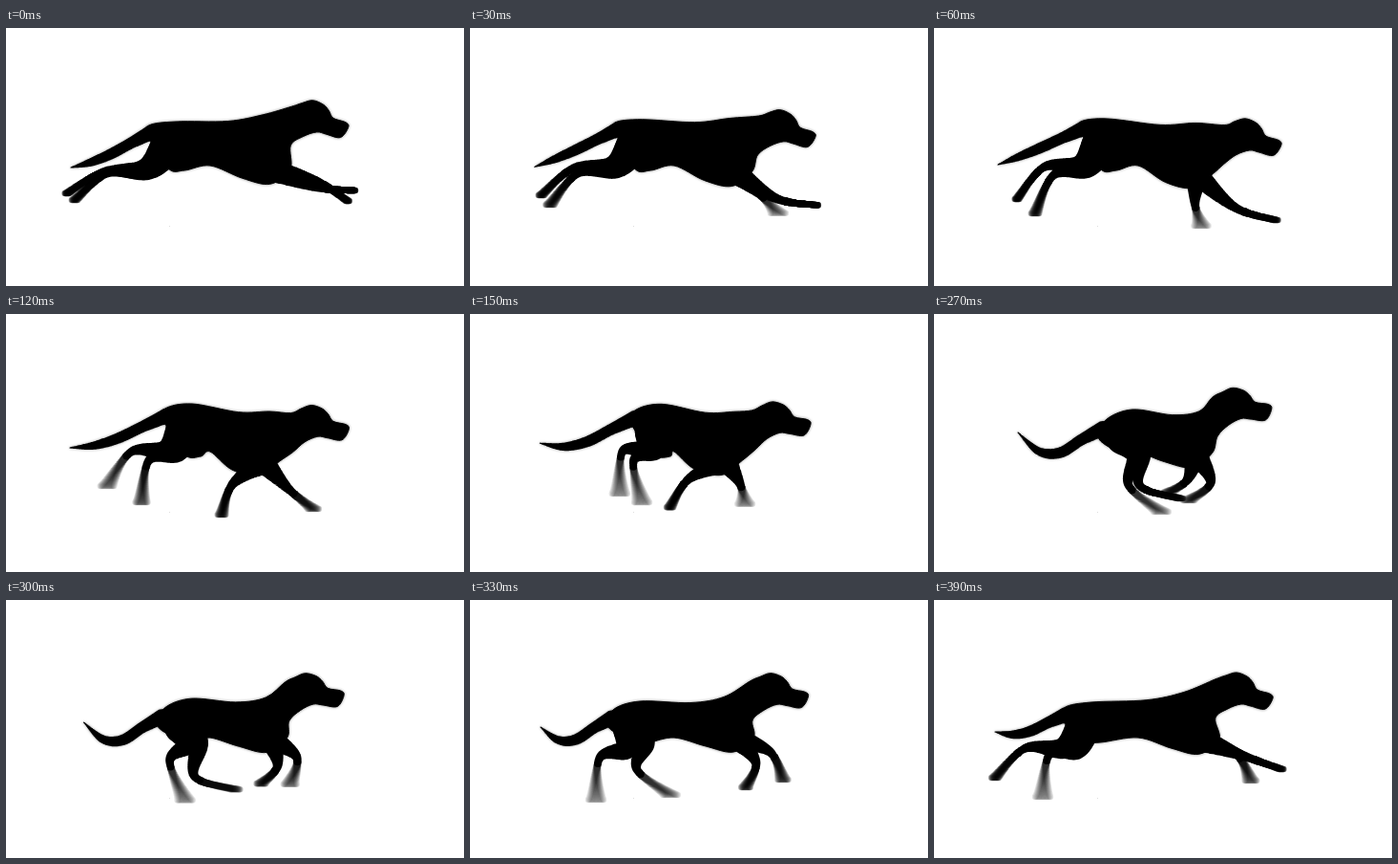
Write an HTML page with a canvas that moves like this. It is 480 px wide and 270 px high and loops after 420 ms.

```html
<!DOCTYPE html>
<html lang="en">
<head>
<meta charset="utf-8">
<title>Running dog</title>
<style>
html, body { margin: 0; width: 100%; height: 100%; overflow: hidden; background: #fff; }
canvas { display: block; }
</style>
</head>
<body>
<canvas id="stage" width="480" height="270"></canvas>
<script>
const ctx = document.getElementById('stage').getContext('2d');
const LOOP = 420, STEP = 30;

// Key points of the gait; everything else follows from them.
const KEYS = [0, 60, 120, 210, 270, 330, 390];
const rump = [[178,98], [182,95], [195,94], [210,96], [208,100], [178,106], [165,107]];
const brow = [[330,95], [335,114], [330,114], [323,100], [324,95], [325,95], [326,95]];
const tailTip = [[68,146], [67,143], [67,140], [88,125], [88,124], [74,133], [64,138]];
const toes = {
  hindFar:  [[64,173], [87,179], [106,180], [264,206], [238,207], [132,209], [64,186]],
  hindNear: [[72,180], [106,194], [142,197], [257,196], [258,193], [210,204], [114,206]],
  foreFar:  [[358,181], [280,207], [226,210], [195,184], [245,187], [289,196], [332,189]],
  foreNear: [[365,170], [358,201], [322,204], [227,187], [267,195], [328,188], [364,177]]
};
const HEAD = [
  [-31,-12], [-20,-16], [-9,-19], [2,-15], [8,-9], [13,-1], [26,3],
  [29,8], [21,19], [6,16], [-4,14], [-18,19], [-31,29]
];

// Swings between -1 and 1 once per loop, highest at the given time.
const wave = (t, peak) => Math.cos((t - peak) / LOOP * 2 * Math.PI);
const add = ([x, y], dx, dy) => [x + dx, y + dy];
const mix = (a, b, u) => a.map((v, j) => v + (b[j] - v) * u);
const clamp = (v, lo, hi) => Math.min(hi, Math.max(lo, v));

// Smooth periodic interpolation of a track at time t.
function at(track, t) {
  t = (t + LOOP) % LOOP;
  const n = KEYS.length;
  let i = n - 1;
  while (KEYS[i] > t) i--;
  const time = k => KEYS[(k + n) % n] + LOOP * Math.floor(k / n);
  const key = k => track[(k + n) % n];
  const span = time(i + 1) - time(i), u = (t - time(i)) / span;
  const slope = (k, j) => (key(k + 1)[j] - key(k - 1)[j]) / (time(k + 1) - time(k - 1)) * span;
  return key(i).map((a, j) => {
    const m0 = slope(i, j), m1 = slope(i + 1, j), d = key(i + 1)[j] - a;
    return a + u * (m0 + u * (3 * d - 2 * m0 - m1 + u * (m0 + m1 - 2 * d)));
  });
}

// Spline through joints, with a radius at each, as a run of dots.
function limb(joints, radii, per) {
  const pts = joints.map((p, i) => [...p, radii[i]]), end = pts.length - 1, out = [];
  for (let k = 0; k <= end * per; k++) {
    const i = Math.min(Math.floor(k / per), end - 1), u = k / per - i;
    const a = pts[Math.max(i - 1, 0)], b = pts[i], c = pts[i + 1], d = pts[Math.min(i + 2, end)];
    out.push(b.map((v, j) => v + u / 2 * (c[j] - a[j] +
      u * (2 * a[j] - 5 * v + 4 * c[j] - d[j] + u * (3 * v - a[j] - 3 * c[j] + d[j])))));
  }
  return out;
}

function dots(list, shift = () => 0) {
  ctx.beginPath();
  list.forEach(([x, y, r], i) => {
    const cx = x + shift(i), cr = Math.max(r, .3);
    ctx.moveTo(cx + cr, y);
    ctx.arc(cx, y, cr, 0, 7);
  });
  ctx.fill();
}

// A point part of the way from a to b, pushed forward by the bend.
function bent(a, b, part, bend) {
  const dx = b[0] - a[0], dy = b[1] - a[1], len = Math.hypot(dx, dy);
  return add(mix(a, b, part), dy / len * bend, -dx / len * bend);
}

// The last bone is smeared sideways in step with the speed of the toe.
function leg(joints, radii, track, t) {
  const [before, after] = [at(track, t - 15), at(track, t + 15)];
  const smear = Math.min(10, 1 + 7 * Math.abs(after[0] - before[0]) / 30);
  const per = 24, copies = 13, all = limb(joints, radii, per);
  const cut = Math.round((joints.length - 1.8) * per);
  dots(all.slice(0, cut));
  ctx.globalAlpha = Math.max(.12, .45 - smear * .035);
  for (let c = 0; c < copies; c++) {
    const dx = smear * (2 * c / (copies - 1) - 1);
    dots(all.slice(cut), i => dx * Math.min(1, i / per));
  }
  ctx.globalAlpha = 1;
}

function hindLeg(track, hip, t) {
  const toe = at(track, t);
  const dx = clamp((toe[0] - hip[0]) / 2 + 14, -38, 42);
  const hock = add(toe, -dx, -Math.sqrt(44 * 44 - dx * dx));
  leg([hip, bent(hip, hock, .4, 12), hock, toe], [18, 11, 4.5, 3.3], track, t);
}

function foreLeg(track, shoulder, bend, t) {
  const toe = at(track, t);
  leg([shoulder, bent(shoulder, toe, .55, bend), toe], [12, 4.8, 3.3], track, t);
}

function outline(pts) {
  const n = pts.length, p = i => pts[(i + n) % n];
  ctx.beginPath();
  ctx.moveTo(...p(0));
  for (let i = 0; i < n; i++) {
    const [a, b, c, d] = [p(i - 1), p(i), p(i + 1), p(i + 2)];
    ctx.bezierCurveTo(
      b[0] + (c[0] - a[0]) / 6, b[1] + (c[1] - a[1]) / 6,
      c[0] - (d[0] - b[0]) / 6, c[1] - (d[1] - b[1]) / 6, c[0], c[1]);
  }
  ctx.fill();
  ctx.stroke();
}

function drawTail(hip, fold, t) {
  const tip = at(tailTip, t), base = add(hip, -28 - 3 * fold, 15 + 5 * fold);
  const sag = 11 + 10 * fold;
  const joints = [0, 1, 1.1, .5, 0].map((s, i) => add(mix(tip, base, i / 4), 0, s * sag));
  dots(limb(joints, [.6, 4.2, 5.7, 6, 8], 20));
}

function drawBody(hip, chest, fold, t) {
  const face = at(brow, t), turn = -.06 + .09 * wave(t, 20);
  const c = Math.cos(turn), s = Math.sin(turn);
  outline([
    add(hip, -28, 7 + 4 * fold),
    hip,
    add(mix(hip, face, .36), 0, 3.5 + 4 * fold),
    add(mix(hip, face, .6), 0, -1 + 6 * fold),
    ...HEAD.map(([x, y]) => add(face, x * c - y * s, x * s + y * c)),
    add(chest, 21, -15),
    chest,
    add(chest, -29, -6),
    [214, 144],
    [hip[0] + 9, 149],
    [hip[0] - 8, 147],
    add(hip, -31 - 4 * fold, 23 + 8 * fold)
  ]);
}

function draw(t) {
  ctx.fillStyle = '#fff';
  ctx.fillRect(0, 0, 480, 270);
  ctx.fillStyle = '#ddd';
  ctx.fillRect(171, 207, 1, 1);
  ctx.fillStyle = '#000';

  const fold = wave(t, 260), hip = at(rump, t);
  const chest = [271 + 7 * wave(t, 380), 164 + 5 * wave(t, 115)];
  const hipJoint = add(hip, -10, 29), shoulder = add(chest, 4, -14);

  hindLeg(toes.hindFar, hipJoint, t);
  foreLeg(toes.foreFar, shoulder, 2 + 13 * wave(t, 340), t);
  hindLeg(toes.hindNear, hipJoint, t);
  foreLeg(toes.foreNear, shoulder, 5 + 15 * fold, t);

  ctx.shadowColor = 'rgba(0,0,0,.4)';
  ctx.shadowBlur = 3;
  drawTail(hip, fold, t);
  drawBody(hip, chest, fold, t);
  ctx.shadowColor = 'transparent';
}

function tick() {
  draw(Math.floor(performance.now() % LOOP / STEP) * STEP);
  requestAnimationFrame(tick);
}
tick();
</script>
</body>
</html>
```
